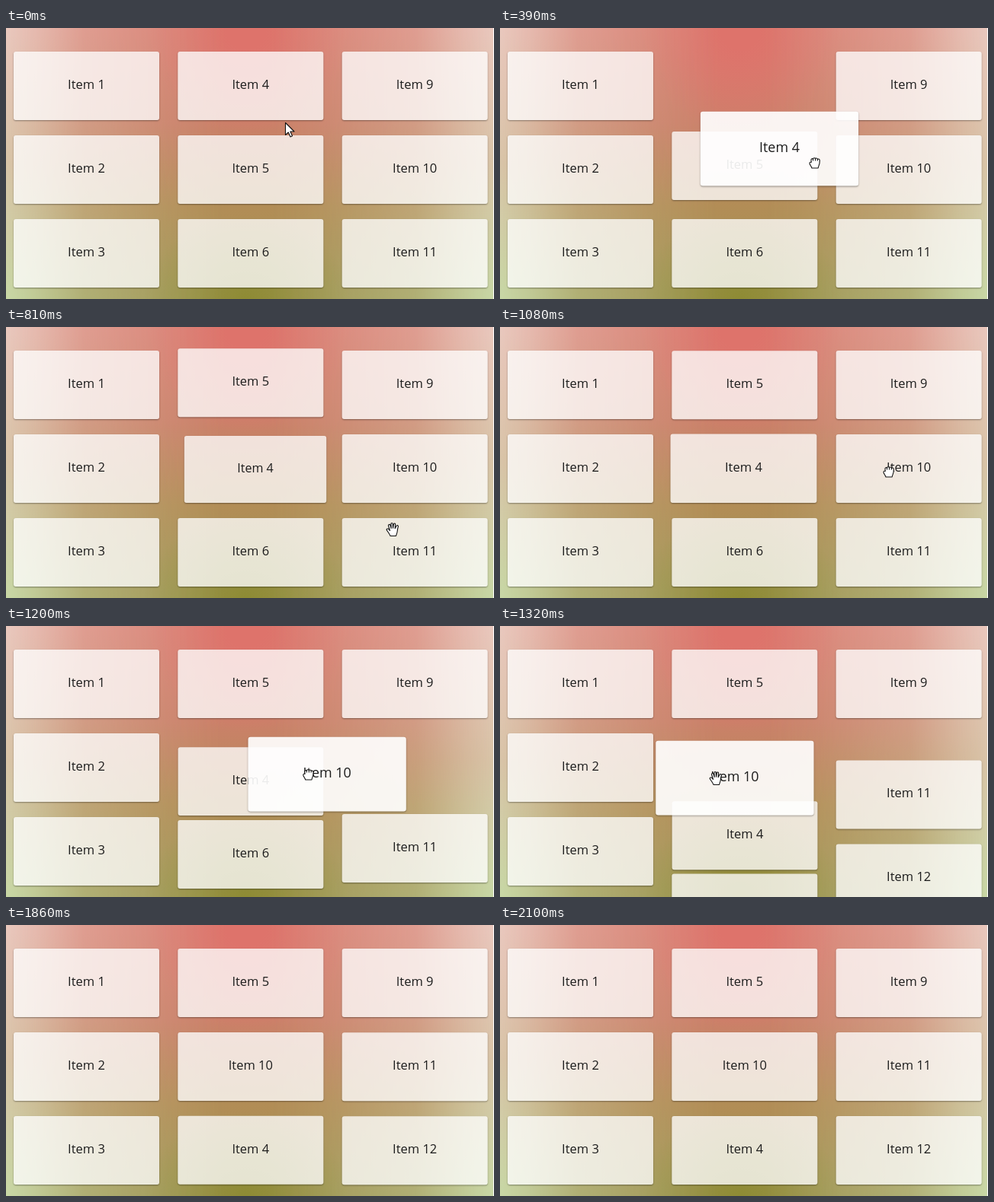
Recreate the animation shown at these times as an HTML page. Size 640 px wide and 356 px high, loop 2200 ms.

```html
<!DOCTYPE html>
<html lang="en">
<head>
<meta charset="utf-8">
<title>Draggable cards</title>
<style>
  html, body { margin: 0; width: 100%; height: 100%; overflow: hidden; }
  #stage {
    position: relative; width: 640px; height: 356px; overflow: hidden;
    background:
      radial-gradient(130px 140px at 315px 0, rgb(222,115,107) 20%, rgba(222,115,107,0)),
      radial-gradient(135px 110px at 315px 356px, rgb(142,139,52), rgba(142,139,52,0)),
      linear-gradient(rgb(217,128,115), rgb(203,128,105) 35%, rgb(178,141,86) 66%, rgb(160,149,84));
  }
  #edges {
    position: absolute; inset: 0;
    background: linear-gradient(rgb(233,200,190), rgb(216,196,168) 50%, rgb(200,216,166));
    --fade: linear-gradient(90deg, #000, #000c 6%, #0006 16%, #0002 33%, #0000 45% 54%,
      #0002 66%, #0006 84%, #000c 94%, #000);
    -webkit-mask-image: var(--fade); mask-image: var(--fade);
  }
  #rim { position: absolute; right: 0; top: 0; width: 1px; height: 100%; background: #fff; }
  .card {
    position: absolute; left: 0; top: 0; width: 191px; height: 90px;
    border-radius: 3px; box-shadow: 0 1px 2px rgba(0,0,0,.38);
    font: 16.5px/85px "Open Sans", "Noto Sans", sans-serif;
    color: #1c1c1c; text-align: center; white-space: nowrap;
  }
  svg { position: absolute; inset: 0; z-index: 9; }
  svg path { fill: #fff; stroke: #111; stroke-width: 1.1; stroke-linejoin: round; }
</style>
</head>
<body>
<div id="stage">
  <div id="edges"></div>
  <div id="rim"></div>
  <svg width="640" height="356"><path id="cursor"/></svg>
</div>
<script>
const LOOP = 2200;
// The picture is held between these times.
const TICKS = [0, 120, 240, 390, 540, 660, 810, 930, 1080, 1200, 1320, 1440, 1600, 1740, 1860, 1980, 2100];
const ROW_STEP = 110, LIFT = 0.085, FILL = 0.77, DRAG_FILL = 0.91;

const slot = (col, row) => ({ x: 105.5 + col * 215.33, y: 76 + row * ROW_STEP });
const mix = (a, b, p) => a + (b - a) * p;

// Damped spring from 1 to 0, starting at rest.
const spring = (decay, freq) => t => t <= 0 ? 1 :
  Math.exp(-decay * t) * (Math.cos(freq * t) + decay / freq * Math.sin(freq * t));
const settle = spring(0.0088, 0.0095);
const bounce = spring(0.006, 0.015);

const columns = [[1, 2, 3], [4, 5, 6], [9, 10, 11, 12]];
const slides = [
  { id: 5, start: 365, rows: -1 },
  { id: 4, start: 1148, rows: 1 },
  { id: 6, start: 1178, rows: 1 },
  { id: 11, start: 1178, rows: -1 },
  { id: 12, start: 1178, rows: -1 }
];
const drags = {
  4: { press: 240, release: 603, grab: [-46.5, -18.5], target: slot(1, 1) },
  10: { press: 1080, release: 1320, grab: [24.4, -0.4], target: slot(1, 1) }
};

// Pointer route: time, x, y.
const route = [
  [0, 366.5, 124.5], [120, 355, 77], [240, 367, 95], [390, 413, 177], [540, 431, 203],
  [810, 507.5, 266], [1080, 510, 190], [1320, 283.5, 200]
];
const shapes = {
  none: "",
  arrow: "M0 0V16L3.8 12.5L6.5 18.5L9 17.3L6.4 11.5H11.5Z",
  open: "M-3.5 8.5C-4 6-8 1.5-8.3.5C-8.6-1-6.5-1.6-5.5-.3L-4 1.5L-6-5C-6.3-6.8-4-7.2-3.5-5.5L-2.3-1.5" +
    "L-2.6-7.2C-2.6-9-.4-9-.3-7.2L0-1.8L1-7C1.4-8.6 3.4-8.2 3.1-6.5L2.6-1.2L4.6-4.8C5.5-6.2 7.4-5.2 6.8-3.6" +
    "C6-1 5.8 1 5.6 3C5.4 5 4.3 6.5 4 8.5Z",
  closed: "M-4 7C-4.5 5-7 2.5-7 .8C-7-.8-5-1-4.7-.6L-5-3.5C-5-5.4-3-5.8-2.4-4.8C-2.2-6.6.2-6.7.6-5.3" +
    "C1-6.5 3.2-6.2 3.4-4.6C4.5-5.6 6.4-4.6 6.3-2.8C6.3 0 6 2 5.2 3.6C4.6 5 4.3 6 4.2 7Z" +
    "M-2.4-4.8V-2.5M.6-5.3V-2.5M3.4-4.6V-2.5"
};

function pointerAt(t) {
  const next = route.findIndex(point => point[0] > t);
  if (next < 0) return route.at(-1).slice(1);
  const [a, b] = [route[next - 1], route[next]];
  const p = (t - a[0]) / (b[0] - a[0]);
  return [mix(a[1], b[1], p), mix(a[2], b[2], p)];
}

function pointerShape(t) {
  if (t < 120) return "arrow";
  if (t >= 1440) return "none";
  const held = Object.values(drags).some(d => t >= d.press && t < d.release);
  return held ? "closed" : "open";
}

function poseAt(id, home, t) {
  let { x, y } = home;
  let lift = 0;
  const drag = drags[id];
  if (drag && t > drag.press) {
    const [px, py] = pointerAt(Math.min(t, drag.release));
    const rest = settle(t - drag.release);
    x = mix(drag.target.x, px + drag.grab[0], rest);
    y = mix(drag.target.y, py + drag.grab[1], rest);
    lift = Math.min(1, (t - drag.press) / 100) * bounce(t - drag.release);
  }
  for (const s of slides) {
    if (s.id === id) y += s.rows * ROW_STEP * (1 - settle(t - s.start));
  }
  return { x, y, lift };
}

const stage = document.getElementById("stage");
const cursor = document.getElementById("cursor");
const cards = columns.flatMap((ids, col) => ids.map((id, row) => {
  const node = document.createElement("div");
  node.className = "card";
  node.textContent = "Item " + id;
  stage.append(node);
  return { id, home: slot(col, row), style: node.style };
}));

function draw(time) {
  const now = time % LOOP;
  const t = TICKS.findLast(tick => tick <= now) ?? 0;
  for (const { id, home, style } of cards) {
    const { x, y, lift } = poseAt(id, home, t);
    style.transform = `translate(${x - 95.5}px, ${y - 45}px) scale(${1 + LIFT * lift})`;
    style.background = `rgba(255,255,255,${mix(FILL, DRAG_FILL, Math.max(0, lift))})`;
    style.zIndex = lift > 0.1 ? 2 : 1;
  }
  cursor.setAttribute("d", shapes[pointerShape(t)]);
  cursor.setAttribute("transform", `translate(${pointerAt(t)})`);
}

function loop() {
  draw(performance.now());
  requestAnimationFrame(loop);
}
loop();
</script>
</body>
</html>
```
